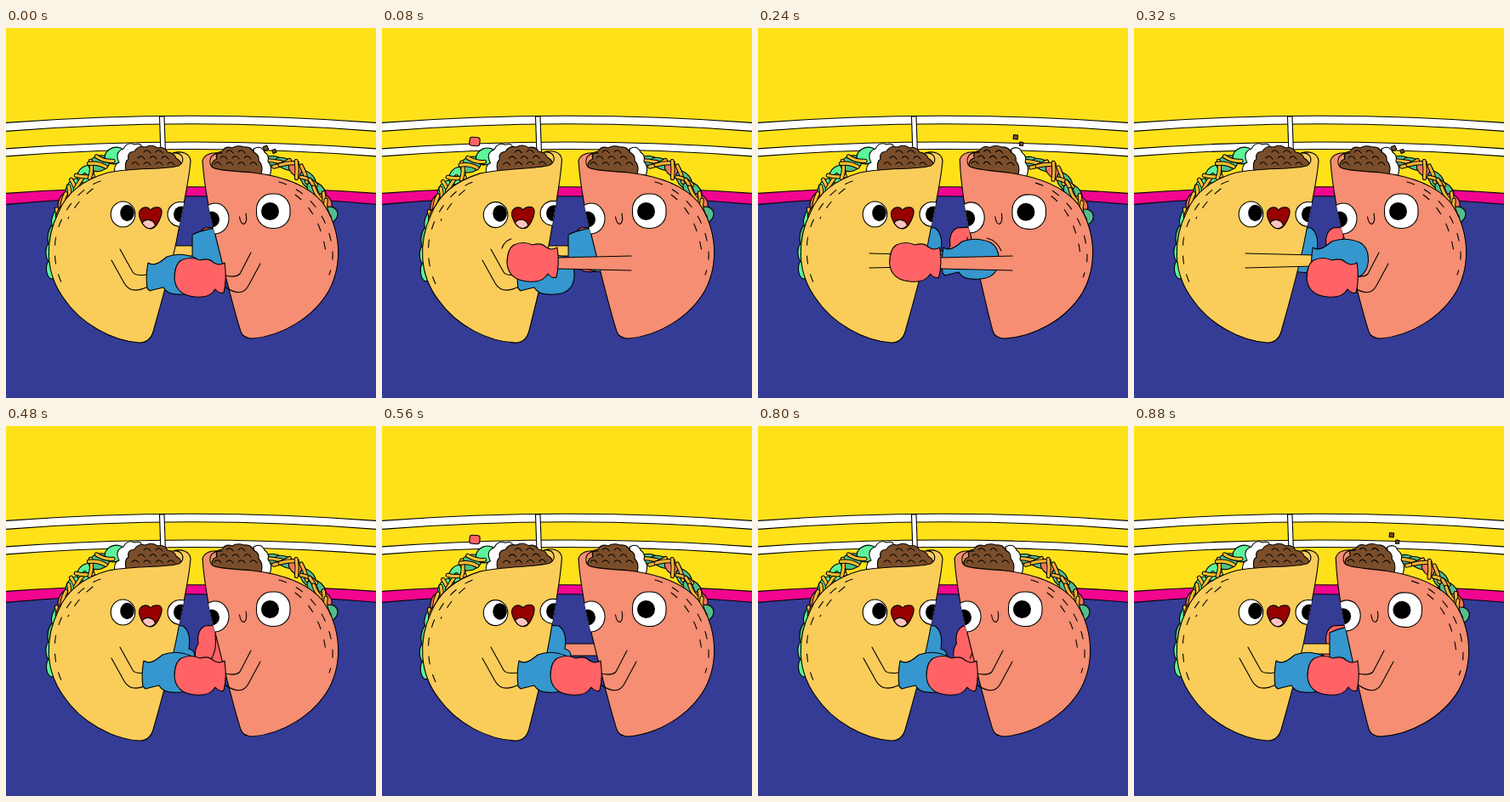
Animation of 435 by 435 pixels, one loop 960 ms. Source, as an HTML page:

```html
<!DOCTYPE html>
<html lang="en">
<head>
<meta charset="utf-8">
<title>Taco boxing</title>
<style>
  html, body { margin: 0; width: 100%; height: 100%; overflow: hidden; background: #ffe11a; }
  svg { display: block; width: 100vw; height: 100vh; }
  .ink { stroke: #000; stroke-width: 1.1; stroke-linejoin: round; stroke-linecap: round; }
  .line { fill: none; }
  .stitch { fill: none; stroke-dasharray: 9 13; }
  .blue { fill: #3597ce; }
  .red { fill: #ff6366; }
  .corn { fill: #facd5a; }
  .salmon { fill: #f58e72; }
  .white { fill: #fff; }
  .meat { fill: #7b4e2b; }
  .black { fill: #000; stroke: none; }
</style>
</head>
<body>
<svg viewBox="0 0 435 435" class="ink">
  <defs>
    <path id="shellL" d="M196 147C206 144 216 147 217 156C215 182 207 215 202 242C195 280 182 325 173 357Q169 370 157 370C125 368 88 348 68 318C46 288 45 250 62 216C72 192 92 178 120 170C150 164 185 167 203 162Q210 158 207 151Q204 146 196 147Z"/>
    <path id="shellR" d="M254 147Q234 145 231 156C233 185 240 222 246 243C254 275 266 325 276 357Q279 365 290 365C325 362 362 340 380 308C397 275 393 235 372 205C355 185 325 174 290 170C270 168 250 168 243 164Q238 160 241 152Q244 147 254 147Z"/>
    <path id="guideL" d="M53 284C49 240 70 172 128 150"/>
    <path id="guideR" d="M314 156C340 158 368 185 379 220"/>
    <clipPath id="clipL"><use href="#shellL"/></clipPath>
    <clipPath id="clipR"><use href="#shellR"/></clipPath>
  </defs>

  <g id="ring">
    <path fill="#ffe11a" stroke="none" d="M0 0H435V435H0Z"/>
    <path class="white" d="M-2 111.500Q218 95 437 111.500V121.500Q218 104 -2 121.500Z"/>
    <path class="white" d="M-2 142Q218 126 437 142V151Q218 134 -2 151Z"/>
    <path class="white" d="M180.500 104H186L187.500 148H182Z"/>
    <path fill="#f2058f" d="M-2 194.500Q218 179 437 194.500V212H-2Z"/>
    <path fill="#343c96" d="M-2 207.500Q218 188 437 207.500V437H-2Z"/>
  </g>

  <g id="farR">
    <path class="salmon" id="farArmR" d="M280 256H350V270H280Z"/>
    <path class="red" d="M283 243Q260 232 234 235Q224 240 226 256Q221 263 223 274Q232 290 255 286Q270 284 283 276Z"/>
    <path class="line" d="M246 246Q248 262 242 273"/>
  </g>
  <g id="farL">
    <path class="corn" id="farArmL" d="M90 256H160V268H90Z"/>
    <path class="blue" d="M157 243Q180 232 208 235Q218 242 215 262Q223 264 222 272Q215 290 195 287Q175 284 157 276Z"/>
  </g>

  <g id="tacoL">
    <g id="fillL"></g>
    <path class="white" d="M128 172Q126 160 133 158Q127 146 138 142Q143 133 151 137Q160 134 160 143L152 170Z"/>
    <path class="corn" d="M185 152Q200 144 210 150V165H185Z" stroke="none"/>
    <path class="meat" d="M141 168Q139 157 144 154Q142 146 151 145Q155 138 164 140Q172 136 178 141Q186 139 190 146Q198 147 200 153Q207 157 206 163L190 168Z"/>
    <path class="line" id="crumbleL"/>
    <use href="#shellL" class="corn"/>
    <path class="stitch" d="M111 180C82 190 62 222 58 250C55 275 62 295 70 309"/>
    <path class="stitch" d="M102 189Q84 203 73 224"/>
    <g clip-path="url(#clipL)">
      <ellipse class="white" cx="205" cy="219" rx="15" ry="14.500"/>
      <ellipse class="black" cx="206" cy="219" rx="9" ry="9.500"/>
    </g>
    <ellipse class="white" cx="137.500" cy="219" rx="14.300" ry="15"/>
    <ellipse class="black" cx="142.500" cy="217.500" rx="8.300" ry="9.700"/>
    <path fill="#980000" d="M170 214Q166 209 160 212Q154 216 158 225Q162 236 171 236Q177 235 182 222Q185 213 180 211Q173 210 170 214Z"/>
    <path fill="#ffc4c0" d="M160 229Q165 223 172 227Q176 230 175 233Q167 240 160 229Z"/>
  </g>

  <g id="tacoR">
    <g id="fillR"></g>
    <path class="white" d="M291 142Q300 137 304 146Q310 150 308 157Q314 164 310 174L296 172Z"/>
    <path class="salmon" d="M240 150Q250 145 262 152V166H242Z" stroke="none"/>
    <path class="meat" d="M242 164Q241 156 248 154Q245 146 254 145Q258 138 266 141Q272 137 280 140Q288 139 291 146Q298 149 297 156Q303 162 300 172L255 170Z"/>
    <path class="line" id="crumbleR"/>
    <use href="#shellR" class="salmon"/>
    <path class="stitch" d="M321 181C354 190 376 220 382 250Q387 270 380 290"/>
    <path class="stitch" d="M340 196C362 212 374 240 377 272"/>
    <g clip-path="url(#clipR)">
      <ellipse class="white" cx="246" cy="224" rx="16" ry="18"/>
      <circle class="black" cx="241.500" cy="225" r="9.500"/>
    </g>
    <rect class="white" x="294.500" y="195" width="39.500" height="40.500" rx="18"/>
    <circle class="black" cx="310.500" cy="215.500" r="10.500"/>
    <path class="line" d="M274.500 222Q276 231 280 230.500Q284 228 282 218"/>
  </g>

  <path class="line" id="bentL" d="M134 260L149 287Q152 292 165 290M124 273L139 300Q147 314 167 304"/>
  <path id="jabFillL" class="corn" stroke="none"/>
  <path class="line" id="jabL"/>
  <path class="blue" id="gloveL" d="M167 276C174 281 182 275 189 269Q205 263 222 270Q233 276 232 293Q230 312 210 313Q190 315 185 305Q176 307 169 309L166 306Q164 291 167 276Z"/>
  <path class="line" id="bentR" d="M288 264L275 289Q270 294 257 291M299 277L285 303Q277 318 257 304"/>
  <path id="jabFillR" class="salmon" stroke="none"/>
  <path class="line" id="jabR"/>
  <path class="red" id="gloveR" d="M257 276C250 280 246 277 243 275Q238 270 228 273Q217 268 206 273Q198 278 198 295Q200 314 222 316Q240 318 246 307Q251 313 256 311Q260 295 257 276Z"/>

  <path class="line" id="dentL" d="M141 259Q144 250 152 248"/>
  <path class="line" id="dentR" d="M269 247Q281 250 286 262"/>
  <rect class="red" id="bitsL" x="-6" y="-5" width="12" height="10" rx="3"/>
  <path class="meat" id="bitsR" d="M-6-6H-1V-1H-6ZM2 2H6V6H2Z"/>
</svg>
<script>
const $ = id => document.getElementById(id);
const STEP = 80, STEPS = 12;
const HOLD = [1, .85, .85, -.1]; // reach per step: hit, recover, hold, settle
const jabs = [
  { side: 'R', at: 1, near: true },
  { side: 'L', at: 3, near: true },
  { side: 'R', at: 7 },
  { side: 'L', at: 11 }
];
const sides = {
  L: { dir: 1, lean: -1.5, foot: '160 368', shoulder: 131, cuff: 169, armY: 265, bits: [109, 133.5, -8, 15.5] },
  R: { dir: -1, lean: 1.7, foot: '285 365', shoulder: 293, cuff: 257, armY: 268, bits: [306, 132, 4, 11] }
};

function random(seed) {
  return () => (seed = seed * 16807 % 2147483647) / 2147483647;
}

// Lettuce leaves along a guide, with cheese shreds tossed on top.
function toppings(side, leaves, colors, cheese, from, seed) {
  const rnd = random(seed), guide = $('guide' + side), length = guide.getTotalLength();
  const place = (t, turn) => {
    const p = guide.getPointAtLength(t * length), q = guide.getPointAtLength(t * length + 1);
    const angle = Math.atan2(q.y - p.y, q.x - p.x) * 180 / Math.PI;
    return `transform="translate(${p.x} ${p.y}) rotate(${angle + turn})"`;
  };
  let out = '';
  for (let i = 0; i < leaves; i++) {
    const t = i / (leaves - 1);
    out += `<ellipse fill="${colors[i % colors.length]}" rx="${11 + 3 * rnd()}" ry="${5.5 + 4 * t}" ${place(t, 50 * t * (rnd() - .5))}/>`;
  }
  for (let i = 0; i < 10; i++) {
    const spot = place(from + (.92 - from) * i / 9, 110 * (rnd() - .5));
    const d = `d="M-10 ${4 - 8 * rnd()}Q0 ${8 * rnd() - 4} 10 0"`;
    out += `<g class="line" ${spot}><path stroke-width="5.2" ${d}/><path stroke="${cheese}" stroke-width="3.2" ${d}/></g>`;
  }
  $('fill' + side).innerHTML = out;
}

function crumble(side, x) {
  let d = '';
  for (let row = 0; row < 3; row++)
    for (let i = 0; i < 2 + row; i++)
      d += `M${x + 14 * (i - (1 + row) / 2) - 4} ${146 + row * 7}q4-5 8 1`;
  $('crumble' + side).setAttribute('d', d);
}

toppings('L', 9, ['#5cf59a', '#5cf59a', '#4fbf85', '#5cf59a', '#ff6b57'], '#ffc02e', .38, 11);
toppings('R', 7, ['#55bd8c', '#55bd8c', '#f0785f'], '#f5b434', 0, 29);
crumble('L', 173);
crumble('R', 270);

const move = (id, x, y = 0, turn = 0) =>
  $(id).setAttribute('transform', `translate(${x} ${y}) rotate(${turn})`);
const show = (id, on) => { $(id).style.display = on ? '' : 'none'; };

function pose(step) {
  const age = jab => (step - jab.at + STEPS) % STEPS;
  for (const side in sides) {
    const { dir, lean, foot, shoulder, cuff, armY, bits } = sides[side];
    const reach = near => HOLD[age(jabs.find(j => j.side === side && !!j.near === near))] || 0;
    const taken = jabs.filter(j => j.side !== side).sort((a, b) => age(a) - age(b))[0];
    const since = age(taken), hit = since === 0, shift = hit ? -6 * dir : 0;

    $('taco' + side).setAttribute('transform', `rotate(${hit ? lean : 0} ${foot})`);
    show('dent' + side, hit && taken.near);
    show('bits' + side, since < 2);
    move('bits' + side, bits[0] + since * bits[2], bits[1] + since * bits[3], 5 - 30 * since);

    const far = reach(false);
    move('far' + side, 73 * dir * far);
    show('farArm' + side, far > 0);

    const near = reach(true), out = near > 0;
    const dx = near ? 51 * dir * near : shift;
    const a = shoulder + shift, b = cuff + dx;
    const top = `M${a} ${armY}L${b} ${armY + 2}`;
    move('glove' + side, dx, out ? -18 : 0);
    move('bent' + side, shift);
    $('jab' + side).setAttribute('d', `${top}M${a} ${armY + 17}L${b} ${armY + 15}`);
    $('jabFill' + side).setAttribute('d', `${top}V${armY + 15}L${a} ${armY + 17}Z`);
    show('jab' + side, out);
    show('jabFill' + side, out);
    show('bent' + side, !out);
  }
}

let last = -1;
const start = performance.now();
function tick(now) {
  const step = Math.floor(Math.max(0, now - start) / STEP) % STEPS;
  if (step !== last) pose(last = step);
  requestAnimationFrame(tick);
}
tick(start);
</script>
</body>
</html>
```
